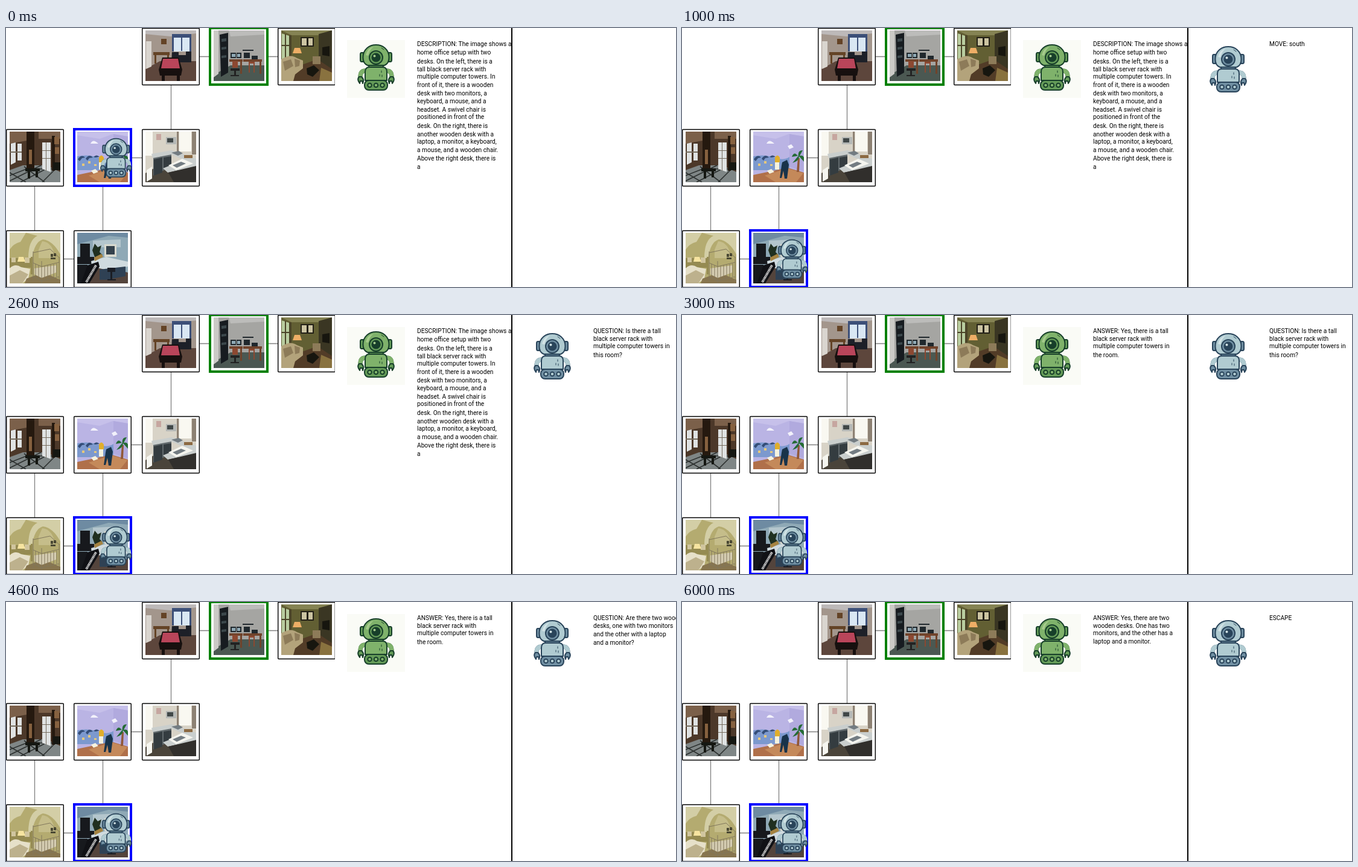
An HTML page for the animation above (7 s loop, 1110 by 430 pixels).

```html
<!DOCTYPE html>
<html lang="en">
<head>
<meta charset="utf-8">
<title>Two robots and a map of rooms</title>
<style>
html, body { margin: 0; width: 100%; height: 100%; overflow: hidden; background: #fff; }
svg { display: block; }
text { font: 10.2px Roboto, Arial, sans-serif; white-space: pre; }
.blue { --light: #b0cbd1; --mid: #7190a3; --dark: #29445a; --glow: #d3e3e6; }
.green { --light: #7fb26b; --mid: #649b58; --dark: #173f2a; --glow: #a6cb8d; }
.line { fill: none; stroke: var(--dark); stroke-width: 2; stroke-linecap: round; stroke-linejoin: round; }
.light { fill: var(--light); }
.mid { fill: var(--mid); }
.box { fill: none; stroke-width: 4; }
</style>
</head>
<body>
<svg width="1110" height="430" viewBox="0 0 1110 430">
  <defs>
    <clipPath id="photo"><path d="M0 0H84V84H0z"/></clipPath>

    <g id="bot">
      <g class="line">
        <path id="arms" d="M-18 44Q-26 44-26 54M18 44Q26 44 26 54" style="stroke-width:7"/>
        <use href="#arms" style="stroke:var(--light);stroke-width:3.4"/>
        <path class="mid" d="M-27 65Q-32 58-28 54H-24Q-19 58-22 65L-23 61H-26zM27 65Q32 58 28 54H24Q19 58 22 65L23 61H26z"/>
        <path class="mid" d="M-21 14h-3q-2 0-2 3v9q0 3 2 3h3zM21 14h3q2 0 2 3v9q0 3-2 3h-3z"/>
        <path class="light" d="M-18 60V46Q-18 38-11 38H11Q18 38 18 46V60z"/>
        <rect class="mid" x="-19" y="60" width="38" height="16" rx="7"/>
        <path class="light" d="M-21.5 22C-21.5-6 21.5-6 21.5 22Q21.5 32 14 35H-14Q-21.5 32-21.5 22z"/>
        <path class="mid" d="M-13 35H13L11 38H-11z"/>
      </g>
      <path d="M-17 18Q-14 6-4 4Q-11 9-13 19z" style="fill:var(--glow)"/>
      <path class="line" d="M9 6l4 3M9 44v3M6 50v3M10 51v3" style="stroke-width:1"/>
      <g style="stroke:var(--dark)" stroke-width="2">
        <circle class="mid" cy="22" r="11"/>
        <circle cy="22" r="6.5" style="fill:var(--dark)"/>
        <g class="light">
          <circle cx="-10.5" cy="68" r="3.3"/><circle cy="68" r="3.3"/><circle cx="10.5" cy="68" r="3.3"/>
        </g>
      </g>
      <circle cx="-2.5" cy="19.5" r="2" style="fill:var(--glow)"/>
    </g>

    <g id="billiards">
      <path fill="#a3968c" d="M0 0H84V84H0z"/>
      <path fill="#bdb9b9" d="M0 0H84V5L42 10L0 6z"/>
      <path fill="#5d463c" d="M0 64L24 51H84V84H0z"/>
      <path fill="#d9d5cf" d="M1 18h9v42l-9 4z"/>
      <path fill="#d9e7f3" d="M47 10H73V35H47z"/>
      <path fill="#3c4f78" d="M44 6H76V12H44zM44 12h3v23h-3zM59 12h2v22h-2zM73 12h3v23h-3z"/>
      <path fill="#644326" d="M26 14h9v9h-9zM13 36H40V41H13zM15 41h3v14h-3zM36 41h3v9h-3z"/>
      <path fill="#1d2028" d="M44 36h11v5h12v-6h9v18H43z"/>
      <path fill="#17100f" d="M28 45H55L61 65L59 75H24L22 65zM27 75h5v9h-5zM52 75h5v9h-5z"/>
      <path fill="#b9455a" d="M29 47H54L57 63H26z"/>
    </g>

    <g id="office">
      <path fill="#a5a5a2" d="M0 0H84V84H0z"/>
      <path fill="#bcbcba" d="M25 0H84V7L28 10z"/>
      <path fill="#4b5852" d="M0 74L28 58H84V84H0z"/>
      <path fill="#cbcac6" d="M0 0H8V72L0 78z"/>
      <path fill="#171c20" d="M10 7L24 4V70L12 77z"/>
      <path fill="#3c484c" d="M13 14l8-1v5l-8 1zM13 28l8-1v4l-8 1zM13 42l8-1v4l-8 1z"/>
      <path fill="#70432b" d="M26 48H48V52H26zM49 48H80V52H49zM44 52h3v20h-3zM76 52h3v20h-3z"/>
      <path fill="#20282d" d="M28 37h9v9h-9zM38 37h8v9h-8zM50 37h10v9H50zM63 42h10v6H63zM48 32h18v2H48z"/>
      <path fill="#8fa9b5" d="M30 39h6v5h-6zM39 39h5v5h-5z"/>
      <path fill="#8c4831" d="M31 51h9v11h-9zM58 52h10v3H58zM58 55h2v15h-2zM66 55h2v15h-2z"/>
      <path fill="#222" d="M28 63h15v4H28zM34 67h3v9h-3zM28 74h14v2H28z"/>
    </g>

    <g id="lounge">
      <path fill="#625f33" d="M0 0H84V84H0z"/>
      <path fill="#858353" d="M0 0H84L66 8H17z"/>
      <path fill="#3a3623" d="M62 6L84 0V67L62 55z"/>
      <path fill="#b9cda0" d="M1 5L13 9V43L1 48z"/>
      <path fill="#4b4428" d="M6 6h2v39H6zM0 24h14v2H0zM13 8h4v36h-4z"/>
      <path fill="#242118" d="M32 11H54V27H32z"/>
      <path fill="#ccc4a2" d="M34 13h8v12h-8zM45 13h7v12h-7z"/>
      <path fill="#eeae66" d="M22 29h9l3 9H19z"/>
      <path fill="#523c27" d="M26 60L60 48L84 64V84H16z"/>
      <path fill="#b3a37b" d="M0 48Q15 38 26 46L36 50V63L23 73L20 84H0z"/>
      <path fill="#8d7b59" d="M3 52l13-4 4 11-14 8zM22 47l9 3-1 9-7 2zM52 43h13v13H52z"/>
      <path fill="#17160f" d="M68 28L80 26V43L68 41zM42 63L54 58L63 66L52 77L43 73z"/>
      <path fill="#89723f" d="M66 62l18 8v14H63z"/>
    </g>

    <g id="hall">
      <path fill="#4c3829" d="M0 0H84V84H0z"/>
      <path fill="#7b604a" d="M0 0H28V15L0 20zM48 0H84V12H48z"/>
      <path fill="#7f8686" d="M0 64L22 56H60L84 67V84H0z"/>
      <path fill="none" stroke="#2c302f" stroke-width="1.6" d="M0 73L28 62H84M0 82L52 56M18 84L66 59M54 84L74 64M24 58L58 84M0 68L27 84"/>
      <path fill="#dfe2e2" d="M2 20L10 18V51L2 55zM13 20h7v28h-7zM54 18H68V67L54 62z"/>
      <path fill="#756c5e" d="M0 33h20v2H0zM54 31h14v1H54zM54 44h14v1H54zM60 18h1v47h-1z"/>
      <path fill="#25190f" d="M28 0H41V61H28zM70 7h5v58h-5z"/>
      <path fill="#86613f" d="M32 30h5v24h-5zM74 9h8v12h-8zM75 26h7v11h-7z"/>
      <path fill="#151712" d="M26 61h24v5H26zM30 66h4v12h-4zM43 66h4v10h-4zM72 51h12v13H72z"/>
    </g>

    <g id="mural">
      <path fill="#bab4e4" d="M0 0H84V84H0z"/>
      <path fill="#c6c0ea" d="M0 0H84V8L59 4L37 12L0 6z"/>
      <path fill="#b1aade" d="M60 4L84 8V66L60 58z"/>
      <path fill="#7c99ce" d="M0 41Q18 37 34 43T60 42V64H0z"/>
      <path fill="#b0704a" d="M0 72L57 60L84 68V84H0z"/>
      <path fill="#c4895a" d="M19 73L57 61L83 69L71 84H37z"/>
      <path fill="#f2f1fb" d="M22 20q4-9 13 0zM57 24l6-3 4 5-7 3z"/>
      <path fill="#344d77" d="M1 46q6-9 12-3l-5 1-4 5zM14 45q6-9 12-2l-6 1-3 4zM27 42q5-5 10 0l-7 1z"/>
      <path fill="#e5c87b" d="M8 53h4v4H8zM18 49h4v4h-4zM28 54h4v3h-4z"/>
      <path fill="#f5f2de" d="M23 65l7-3 5 5-8 3zM36 49h7v14h-7z"/>
      <path fill="#e0ae2c" d="M36 43q4-7 8 0v8h-8zM50 54h6v7h-6z"/>
      <path fill="#18334a" d="M48 51l8-4 3 8-3 23h-4l-2-13-3 12h-3l3-21z"/>
      <path fill="#915838" d="M74 44h3l-1 23h-4z"/>
      <path fill="#246b35" d="M75 42Q68 31 64 42L75 40L65 52Q76 49 76 41L84 50Q86 38 77 40L82 31Q73 31 75 42z"/>
    </g>

    <g id="kitchen">
      <path fill="#d8d3c7" d="M0 0H84V84H0z"/>
      <path fill="#f9f8f1" d="M56 0H76V33H56zM0 0H12V40H0z"/>
      <path fill="#8d8173" d="M52 0h3v33h-3zM77 0h7v38h-7z"/>
      <path fill="#c6a6a0" d="M18 4h8v10h-8z"/>
      <path fill="#b4b7b5" d="M34 9h17v12H34z"/>
      <path fill="#414848" d="M36 11h10v7H36z"/>
      <path fill="#4a443a" d="M0 69L28 53L60 66L69 84H0z"/>
      <path fill="#626a6d" d="M13 39L43 34V58L13 73z"/>
      <path fill="#343c40" d="M14 46l14-3v25l-14 5zM30 43l13-2v17l-13 5z"/>
      <path fill="#c9cecd" d="M10 37L43 31L84 45V58L37 68L29 61L64 47L43 38L12 44z"/>
      <path fill="#312f2c" d="M38 68L84 57V84H47z"/>
      <path fill="#f5f5ef" d="M38 56L61 45L79 53L51 64zM2 64l9-6v20l-9 5z"/>
      <path fill="#737c82" d="M45 56l14-6 8 3-15 7zM43 35l12-3 7 4-8 4z"/>
      <path fill="#8c6a43" d="M64 39h14v5H64z"/>
    </g>

    <g id="bedroom">
      <path fill="#b4ab70" d="M0 0H84V84H0z"/>
      <path fill="#d3cea6" d="M0 0H27L18 15Q6 18 0 28zM27 0H84V36Q72 13 55 11Q41 15 37 43L31 42Q31 12 46 5z"/>
      <path fill="#c5bd8a" d="M54 14Q71 15 76 42H48V28z"/>
      <path fill="#958b52" d="M0 42H35V58H0zM35 40h3v29h-3z"/>
      <path fill="#d0c59f" d="M3 41h7v8H3zM25 41h8v9h-8z"/>
      <path fill="#f6e4a0" d="M15 40h8l3 8H13z"/>
      <path fill="#e6e0c9" d="M0 59Q9 50 19 57L34 60L31 76L21 84H0z"/>
      <path fill="#bdb18d" d="M0 71l17-9 14 7-10 15H0z"/>
      <path fill="#87754f" d="M28 76L56 66L84 78V84H25z"/>
      <path fill="#d5cdb2" d="M41 59L77 54V66L53 75L41 69z"/>
      <path fill="none" stroke="#81775c" d="M39 31V80M53 47V84M82 40V80M39 50L53 56L82 49M39 73L53 80L82 73M43 52V74M48 54V77M58 55V78M63 54V77M68 53V75M73 52V74M78 51V73M39 33L67 27L82 41"/>
      <path fill="#4a4833" d="M68 35h4v5h-4zM73 34h4v5h-4zM68 41h8v3h-8z"/>
    </g>

    <g id="studio">
      <path fill="#8fa9b6" d="M0 0H84V84H0z"/>
      <path fill="#6e8ba2" d="M0 0H84V8L52 5L0 19z"/>
      <path fill="#b4c6cd" d="M26 13L72 11V24H26z"/>
      <path fill="#54443c" d="M0 68L35 54L84 66V84H0z"/>
      <path fill="#203020" d="M25 29l4-11 5 6 6-3-3 11 5 5-12 6z"/>
      <path fill="#17191d" d="M5 18h16v27H5zM0 40h28v12H0zM0 53h17v31H0z"/>
      <path fill="#d0dbdf" d="M23 47L48 40L84 48V56L50 62L24 56z"/>
      <path fill="#2f4154" d="M37 61L80 56V72L48 78H37z"/>
      <path fill="#d8d9cf" d="M45 19H65V40H45z"/>
      <path fill="#34414c" d="M48 22h14v14H48z"/>
      <path fill="#a58341" d="M28 41l12-6 3 5-14 7z"/>
      <path fill="#101115" d="M17 54L35 48L37 56L20 84H6z"/>
      <path fill="none" stroke="#ddd" stroke-width="4" stroke-dasharray="1.6 .8" d="M31 54L15 82"/>
      <path fill="#1b1e25" d="M50 58h13v7H50zM55 65h3v13h-3zM50 77h14v2H50z"/>
    </g>
  </defs>

  <svg width="545" height="430">
    <path fill="none" stroke="#808080" stroke-width="1.3" d="M321 47.5H337M435 47.5H451M273.5 95V168M208 215.5H225M47.5 263V336M160.5 263V336M95 383.5H113"/>
    <g id="rooms"></g>
    <rect class="box" stroke="#008000" x="338" y="0" width="95" height="94"/>
    <g id="agent">
      <rect class="box" stroke="#00f" x="113" y="168" width="94" height="94"/>
      <use href="#bot" class="blue" transform="translate(182.3 182.7) scale(.85)"/>
    </g>
  </svg>

  <path fill="#fafbf6" d="M565 20H661V116H565z"/>
  <use href="#bot" class="green" transform="translate(613 27)"/>
  <use href="#bot" class="blue" id="seeker" transform="translate(905 30)"/>
  <path d="M837 0h2v430h-2z"/>
  <text id="guideText"></text>
  <text id="seekerText"></text>
</svg>

<script>
const $ = id => document.getElementById(id);

// name, column, row
const rooms = [
  ['billiards', 2, 0], ['office', 3, 0], ['lounge', 4, 0],
  ['hall', 0, 1], ['mural', 1, 1], ['kitchen', 2, 1],
  ['bedroom', 0, 2], ['studio', 1, 2]
];
$('rooms').innerHTML = rooms.map(([name, col, row]) => {
  const x = Math.round(5.8 + 112.6 * col), y = 4 + 168 * row;
  return `<g transform="translate(${x} ${y})">
    <rect x="-5.3" y="-3.5" width="94.6" height="94" rx="1" fill="#fff" stroke="#000" stroke-width="1.4"/>
    <use href="#${name}" clip-path="url(#photo)"/></g>`;
}).join('');

const description = 'DESCRIPTION: The image shows a|home office setup with two|desks. On the left, there is a|' +
  'tall black server rack with|multiple computer towers. In|front of it, there is a wooden|' +
  'desk with two monitors, a|keyboard, a mouse, and a|headset. A swivel chair is|positioned in front of the|' +
  'desk. On the right, there is|another wooden desk with a|laptop, a monitor, a keyboard,|' +
  'a mouse, and a wooden chair.|Above the right desk, there is|a';
const askRack = 'QUESTION: Is there a tall|black server rack with|multiple computer towers in|this room?';
const yesRack = 'ANSWER: Yes, there is a tall|black server rack with|multiple computer towers in|the room.';
const askDesks = 'QUESTION: Are there two wooden|desks, one with two monitors|and the other with a laptop|and a monitor?';
const yesDesks = 'ANSWER: Yes, there are two|wooden desks. One has two|monitors, and the other has a|laptop and a monitor.';

// what the guide and the seeker say in each second
const steps = [
  [description, ''], [description, 'MOVE: south'], [description, askRack],
  [yesRack, askRack], [yesRack, askDesks], [yesDesks, askDesks], [yesDesks, 'ESCAPE']
];

// lines are spaced by their own height, so descenders push the next one down
const lineHeight = s => /[gjpqy]/.test(s) ? 14.3 : /[,Q]/.test(s) ? 13.4 : 12;

function say(id, x, words) {
  let y = 30;
  $(id).innerHTML = words.split('|').map(line => {
    const span = `<tspan x="${x}" y="${Math.round(y)}">${line}</tspan>`;
    y += lineHeight(line);
    return span;
  }).join('');
}

let shown = -1;
function draw(now) {
  const step = Math.floor(now / 1000) % steps.length;
  if (step !== shown) {
    shown = step;
    $('agent').setAttribute('transform', `translate(0 ${step ? 168 : 0})`);
    $('seeker').setAttribute('visibility', step ? 'visible' : 'hidden');
    say('guideText', 681, steps[step][0]);
    say('seekerText', 973, steps[step][1]);
  }
  requestAnimationFrame(() => draw(performance.now() - start));
}
const start = performance.now();
draw(0);
</script>
</body>
</html>
```
